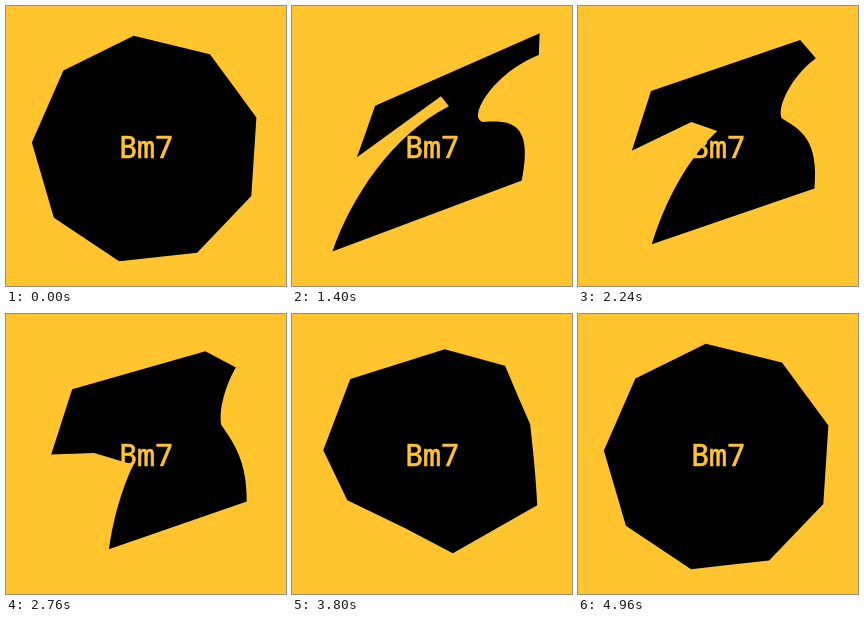
Animation of 280 by 280 pixels, one loop 5 s. Source, as an HTML page with a canvas:

```html
<!DOCTYPE html>
<html lang="en">
<head>
<meta charset="utf-8">
<title>Bm7</title>
<style>
  html, body { margin: 0; width: 100%; height: 100%; overflow: hidden; background: #ffc42e; }
  canvas { display: block; width: 280px; height: 280px; }
</style>
</head>
<body>
<canvas id="stage" width="280" height="280"></canvas>
<script>
const ctx = document.getElementById('stage').getContext('2d');
const YELLOW = '#ffc42e';
const LOOP = 5000, PEAK = 720, STEP = 40;
const SIDES = 9, RADIUS = 114.7, CENTER = { x: 140.3, y: 143.8 }, TILT = -96.3;

// Where each polygon corner ends up at the peak, and how its path bows on the way.
const corners = [
  { end: [254, 25], bow: [2, 41] },
  { end: [249, 48], bow: [2, 22], bend: [-32, -5, -41, 22], power: 3 },
  { end: [188, 117], bow: [0, -16], bend: [13, -23, 28, -46], power: 2 },
  { end: [228, 172], bow: [21, 31] },
  { end: [32, 248], bow: [6, -49], bend: [-23, -7, -21, -23], power: 3 },
  { end: [162, 95], bow: [-54, -58] },
  { end: [159, 84], bow: [-91, -3] },
  { end: [68, 153], bow: [-18, -21] },
  { end: [86, 104], bow: [-30, -47] }
];

// 0 is the regular polygon, 1 the stretched shape: quick attack, slow release.
function stretchAt(t) {
  const u = t < PEAK ? 1 - t / PEAK : (t - PEAK) / (LOOP - PEAK);
  return (1 + Math.cos(Math.PI * u ** 1.05)) / 2;
}

function cornerAt(i, p) {
  const { end, bow } = corners[i];
  const angle = (TILT + i * 360 / SIDES) * Math.PI / 180;
  const start = [CENTER.x + RADIUS * Math.cos(angle), CENTER.y + RADIUS * Math.sin(angle)];
  return start.map((s, k) => s + (end[k] - s) * p + bow[k] * p * (1 - p));
}

function drawShape(p) {
  const points = corners.map((_, i) => cornerAt(i, p));
  ctx.beginPath();
  ctx.moveTo(...points[0]);
  corners.forEach(({ bend, power }, i) => {
    const [x0, y0] = points[i], [x1, y1] = points[(i + 1) % SIDES];
    if (!bend) return ctx.lineTo(x1, y1);
    // Handles sit on the straight edge and move off it as the shape stretches.
    const dx = (x1 - x0) / 3, dy = (y1 - y0) / 3;
    const [ax, ay, bx, by] = bend.map(offset => offset * p ** power);
    ctx.bezierCurveTo(x0 + dx + ax, y0 + dy + ay, x1 - dx + bx, y1 - dy + by, x1, y1);
  });
  ctx.closePath();
  ctx.fillStyle = '#000';
  ctx.fill();
}

function drawLabel() {
  ctx.fillStyle = ctx.strokeStyle = YELLOW;
  ctx.lineWidth = 0.7;
  ctx.font = '30px "Noto Sans Mono", monospace';
  ctx.textAlign = 'center';
  ctx.fillText('Bm7', 140, 151.5);
  ctx.strokeText('Bm7', 140, 151.5);
}

function draw(now) {
  const t = Math.floor((now % LOOP) / STEP) * STEP;
  ctx.fillStyle = YELLOW;
  ctx.fillRect(0, 0, 280, 280);
  drawShape(stretchAt(t));
  drawLabel();
  requestAnimationFrame(draw);
}
draw(performance.now());
</script>
</body>
</html>
```
